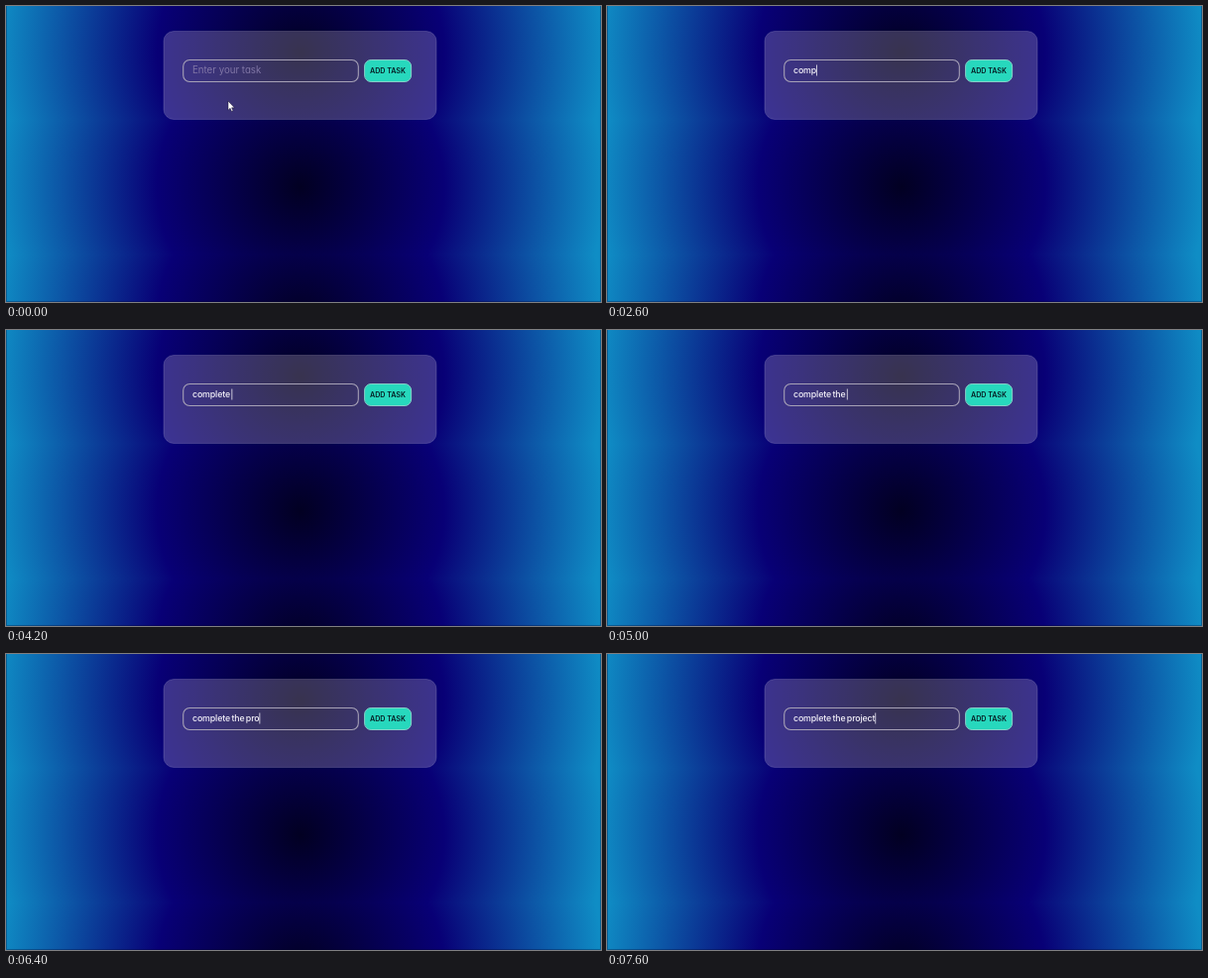
An HTML page for the animation above (8000 ms loop, 600 px wide and 299 px high).

```html
<!DOCTYPE html>
<html lang="en">
<head>
<meta charset="utf-8">
<title>Add task</title>
<style>
  html, body { margin: 0; width: 100%; height: 100%; overflow: hidden; background: #020022; }
  svg { display: block; width: 100%; height: 100%; }
  text { font-family: Inter, "Open Sans", sans-serif; font-feature-settings: "cv11"; white-space: pre; }
  #typed { font-size: 8.8px; font-weight: 500; letter-spacing: -0.14px; word-spacing: -0.8px; }
</style>
</head>
<body>
<svg viewBox="0 0 600 299">
  <defs>
    <radialGradient id="glow" gradientUnits="userSpaceOnUse" cx="297" cy="68" r="305">
      <stop offset="0" stop-color="#020022"/>
      <stop offset="0.475" stop-color="#080076"/>
      <stop offset="1" stop-color="#0f8dc5"/>
    </radialGradient>
    <pattern id="tiles" patternUnits="userSpaceOnUse" y="-21" width="600" height="136">
      <rect width="600" height="136" fill="url(#glow)"/>
    </pattern>
  </defs>

  <rect width="600" height="299" fill="url(#tiles)"/>
  <path d="M0.5 0V298.5H599.5V0" fill="none" stroke="#000028" stroke-opacity="0.3"/>

  <rect x="159" y="25.5" width="275" height="89" rx="10"
        fill="#fff0f5" fill-opacity="0.21" stroke="#fff" stroke-opacity="0.15"/>
  <rect x="178.7" y="54.5" width="176.6" height="22" rx="6.5"
        fill="none" stroke="#a6a1b6" stroke-width="1.1"/>
  <rect x="361.6" y="54.5" width="47" height="22" rx="6.5"
        fill="#27d8bd" stroke="#86cfc8"/>
  <text x="385" y="68" font-size="7.1" font-weight="600" text-anchor="middle" fill="#061b22">ADD TASK</text>

  <text id="placeholder" x="188" y="68" font-size="9.7" fill="#8076a6">Enter your task</text>
  <text id="typed" x="188" y="68" fill="#f4f2fa"></text>
  <rect id="caret" y="59.5" width="0.9" height="11" fill="#d8d5e4"/>
  <path id="pointer" d="M0 0V9.2L2.1 7.3L3.5 10.5L5 9.8L3.6 6.8H6.4Z"
        fill="#fff" stroke="#15102c" stroke-width="0.5"/>
</svg>
<script>
  const LOOP = 8000, STEP = 200;
  const TASK = "complete the project";
  // Time at which each letter of TASK is typed.
  const KEYS = [1800, 2000, 2200, 2400, 2800, 3000, 3200, 3600, 4200, 4400,
                4600, 4800, 5000, 5400, 5800, 6200, 6600, 6800, 7200, 7400];
  const FOCUS = 800, BLINK = 1200, POINTER_GONE = 600;

  const [placeholder, typed, caret, pointer] =
    ["placeholder", "typed", "caret", "pointer"].map(id => document.getElementById(id));
  const show = (node, visible) => node.setAttribute("visibility", visible ? "visible" : "hidden");

  function render(time) {
    const t = Math.floor((time % LOOP) / STEP) * STEP;
    const count = KEYS.filter(key => key <= t).length;

    typed.textContent = TASK.slice(0, count);
    show(placeholder, count === 0);

    const width = count ? typed.getComputedTextLength() : 0;
    caret.setAttribute("x", 188 + width);
    show(caret, count > 0 || (t >= FOCUS && t < BLINK));

    const move = t / POINTER_GONE;
    pointer.setAttribute("transform", `translate(${224 + 4 * move} ${96 - 27 * move * move})`);
    show(pointer, t < POINTER_GONE);
  }

  const start = performance.now();
  function tick() {
    render(performance.now() - start);
    requestAnimationFrame(tick);
  }
  tick();
</script>
</body>
</html>
```
